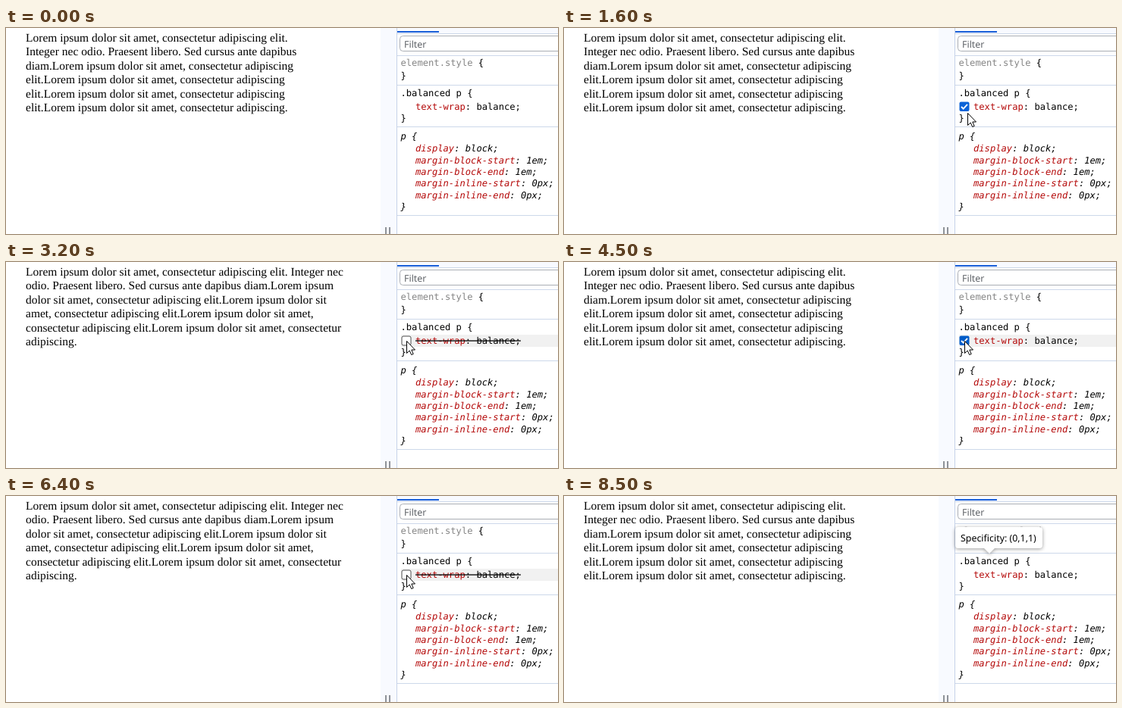
An HTML page with a canvas that plays this animation: 728 px wide and 272 px high, repeating every 8.6 s.

```html
<!DOCTYPE html>
<html lang="en">
<head>
<meta charset="utf-8">
<title>text-wrap: balance</title>
<style>
html, body { margin: 0; width: 100%; height: 100%; overflow: hidden; background: #fff; }
canvas { display: block; }
</style>
</head>
<body>
<canvas id="stage" width="728" height="272"></canvas>
<script>
const ctx = document.getElementById('stage').getContext('2d');
const LOOP = 8600, STEP = 100;
const SERIF = '15.5px "Liberation Serif", serif';
const MONO = '12.15px "DejaVu Sans Mono", monospace';
const SANS = '12.4px "Noto Sans", sans-serif';
const RED = '#b40808', INK = '#000', RULE = '#cdd8ea';

const LOREM = 'Lorem ipsum dolor sit amet, consectetur adipiscing elit.';
const COPY = LOREM + ' Integer nec odio. Praesent libero. Sed cursus ante dapibus diam.' +
  LOREM.repeat(3) + 'Lorem ipsum dolor sit amet, consectetur adipiscing.';

// Pointer tip as [ms, x, y]
const ENTER = [[1000, 574, 272], [1300, 552, 176], [1600, 532, 112], [1900, 528, 104], [7000, 528, 104]];
const LEAVE = [[7100, 528, 101], [7400, 556, 82], [7700, 574, -20]];

function along(path, t) {
  const i = path.findIndex(p => p[0] > t);
  if (i < 0) return path[path.length - 1].slice(1);
  const [t0, x0, y0] = path[i - 1], [t1, x1, y1] = path[i];
  const k = (t - t0) / (t1 - t0);
  return [Math.round(x0 + (x1 - x0) * k), Math.round(y0 + (y1 - y0) * k)];
}

function pointerAt(t) {
  if (t < 1000 || t >= 7700) return null;
  return along(t < 7100 ? ENTER : LEAVE, t);
}

function rect(x, y, w, h, color) {
  ctx.fillStyle = color;
  ctx.fillRect(x, y, w, h);
}

function text(str, x, y, font, color) {
  ctx.font = font;
  ctx.fillStyle = color;
  ctx.fillText(str, x, y);
  return x + ctx.measureText(str).width;
}

function box(x, y, w, h, r, fill, stroke) {
  ctx.beginPath();
  ctx.roundRect(x, y, w, h, r);
  ctx.fillStyle = fill;
  ctx.fill();
  if (stroke) {
    ctx.strokeStyle = stroke;
    ctx.lineWidth = 1;
    ctx.stroke();
  }
}

function shape(points) {
  ctx.beginPath();
  points.forEach(([x, y]) => ctx.lineTo(x, y));
  ctx.closePath();
}

function wrap(str, width) {
  ctx.font = SERIF;
  const lines = [];
  let line = '';
  for (const word of str.split(' ')) {
    const next = line ? line + ' ' + word : word;
    if (ctx.measureText(next).width > width) {
      lines.push(line);
      line = word;
    } else line = next;
  }
  return [...lines, line];
}

function paragraph(balanced) {
  wrap(COPY, balanced ? 363 : 427).forEach((line, i) =>
    text(line, 26, Math.round(18 + i * 18.4), SERIF, INK));
}

function declaration(name, value, y, style = '') {
  const x = text(name, 540, y, style + MONO, RED);
  return text(': ' + value + ';', x, y, style + MONO, INK);
}

function panel() {
  rect(494, 0, 21, 272, '#f8faff');
  rect(500, 263, 2, 9, '#8e9299');
  rect(505, 263, 2, 9, '#8e9299');
  rect(515, 0, 1, 272, '#c6d2e8');
  rect(516, 0, 212, 7, '#f8faff');
  rect(516, 4, 55, 2, '#1a5fd8');
  for (const y of [7, 36, 75, 130, 247]) rect(516, y, 212, 1, RULE);
  box(519.5, 10.5, 240, 20, 4, '#fff', '#a9adb4');
  text('Filter', 525, 25.5, SANS, '#5f6368');
  const x = text('element.style', 520.5, 50, MONO, '#858585');
  text(' {', x, 50, MONO, INK);
  text('}', 520.5, 67, MONO, INK);
}

function checkbox(checked, hover, pressed) {
  if (!checked) {
    box(522, 98, 12, 12, 2, '#fff', hover ? '#4f4f4f' : '#767676');
    return;
  }
  box(521.5, 97.5, 13, 12.5, 2, pressed ? '#3793ff' : hover ? '#005cc8' : '#0b63d8');
  ctx.strokeStyle = '#fff';
  ctx.lineWidth = 1.8;
  ctx.beginPath();
  ctx.moveTo(524, 104);
  ctx.lineTo(526.7, 106.7);
  ctx.lineTo(532, 100.8);
  ctx.stroke();
}

function rules(checked, pointer, pressed) {
  const inRule = pointer && pointer[1] > 75 && pointer[1] < 130;
  const inRow = pointer && pointer[1] >= 96 && pointer[1] < 112;
  if (inRow) rect(521, 96, 207, 16, '#f1f1f1');
  text('.balanced p {', 520.5, 90, MONO, INK);
  const end = declaration('text-wrap', 'balance', 108);
  if (!checked) rect(540, 103.4, end - 540, 1.3, INK);
  text('}', 520.5, 123, MONO, INK);
  if (inRule) checkbox(checked, inRow, pressed);

  const italic = 'italic ';
  text('p {', 520.5, 147, italic + MONO, INK);
  [['display', 'block'], ['margin-block-start', '1em'], ['margin-block-end', '1em'],
   ['margin-inline-start', '0px'], ['margin-inline-end', '0px']]
    .forEach(([name, value], i) => declaration(name, value, Math.round(163.2 + i * 15.4), italic));
  text('}', 520.5, 240, italic + MONO, INK);
}

function tooltip() {
  ctx.save();
  ctx.shadowColor = 'rgba(0,0,0,.4)';
  ctx.shadowBlur = 5;
  ctx.shadowOffsetY = 1;
  box(516, 41, 115, 28, 4, '#fff');
  shape([[553, 68], [569, 68], [561, 76]]);
  ctx.fill();
  ctx.restore();
  rect(552, 64, 18, 5, '#fff');
  text('Specificity: (0,1,1)', 523, 60, SANS, INK);
}

function arrow([x, y]) {
  ctx.save();
  ctx.translate(x + .5, y + .5);
  shape([[0, 0], [0, 16], [3.7, 12.5], [6.2, 18], [8.7, 17], [6.3, 11.5], [11, 11.5]]);
  ctx.fillStyle = '#fff';
  ctx.fill();
  ctx.strokeStyle = '#000';
  ctx.lineWidth = 1;
  ctx.stroke();
  ctx.restore();
}

function draw(t) {
  const checked = !((t >= 2900 && t < 4000) || (t >= 6100 && t < 7100));
  const pressed = t === 2800 || t === 6000;
  const pointer = pointerAt(t);
  rect(0, 0, 728, 272, '#fff');
  ctx.textRendering = 'geometricPrecision';
  paragraph(checked);
  panel();
  rules(checked, pointer, pressed);
  if (t >= 7600) tooltip();
  if (pointer) arrow(pointer);
}

const start = performance.now();
function tick() {
  const t = (performance.now() - start) % LOOP;
  draw(Math.floor(t / STEP) * STEP);
  requestAnimationFrame(tick);
}
tick();
</script>
</body>
</html>
```
